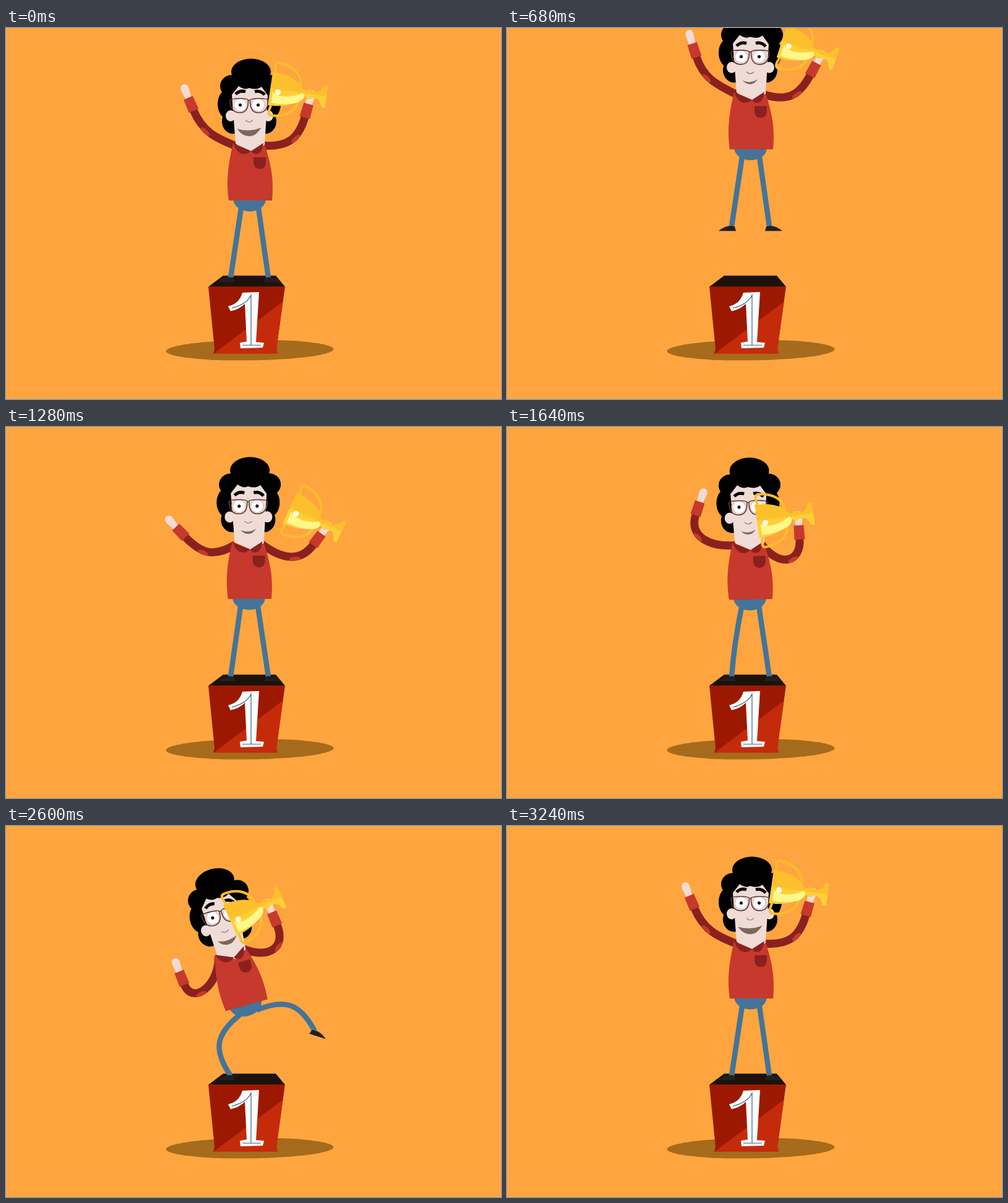
Recreate the animation shown at these times as an HTML page with a canvas. Size 800 by 600 pixels, loop 3280 ms.

```html
<!DOCTYPE html>
<html lang="en">
<head>
<meta charset="utf-8">
<title>Winner</title>
<style>
html, body { margin: 0; width: 100%; height: 100%; overflow: hidden; background: #ffa53f; }
canvas { display: block; width: 800px; height: 600px; }
</style>
</head>
<body>
<canvas id="stage" width="800" height="600"></canvas>
<script>
const ctx = document.getElementById('stage').getContext('2d');
const LOOP = 3280, FLOOR = 404;
const RED = '#c6392c', MAROON = '#8a211f', SKIN = '#f0dcd7', JEANS = '#447499', GOLD = '#fcbd2b';

// Hip position and tilt, smile and kick amounts, wrists relative to the hip with hand turns.
const cheer = {
  x: 394, y: 279, tilt: 0, smile: 1, kick: 0,
  leftX: -91, leftY: -146, leftTurn: -23, rightX: 89, rightY: -135, rightTurn: 16
};
const pose = changes => ({ ...cheer, ...changes });
const crouch = pose({ y: 314, smile: 0, leftX: -116, leftY: -75, leftTurn: -75, rightX: 97, rightY: -70, rightTurn: 65 });
const jump = pose({ smile: 0.15, leftX: -88, leftY: -150, leftTurn: -18, rightX: 96, rightY: -120, rightTurn: 28 });
const land = pose({ x: 395, y: 308, tilt: 4, smile: 0, leftX: -82, leftY: -66, leftTurn: -5, rightX: 114, rightY: -71, rightTurn: 58 });
const swing = pose({ x: 393, y: 278, smile: 0.2, leftX: -105, leftY: -90, leftTurn: -50, rightX: 108, rightY: -85, rightTurn: 45 });
const settle = pose({ x: 393, tilt: -1, smile: 0.1, leftX: -88, leftY: -137, leftTurn: 18, rightX: 80, rightY: -98, rightTurn: -4 });
const kick = pose({ x: 389, y: 289, tilt: -13, smile: 0.2, kick: 1, leftX: -107, leftY: -60, leftTurn: -2, rightX: 64, rightY: -143, rightTurn: 8 });
const lean = pose({ x: 388, y: 290, tilt: -15.6, smile: 0.6, kick: 1.25, leftX: -100, leftY: -34, leftTurn: -22, rightX: 50, rightY: -130, rightTurn: -23 });

const timeline = [
  [0, cheer], [240, crouch], [440, jump], [840, jump], [1000, land], [1200, swing],
  [1640, settle], [2040, kick], [2600, lean], [2900, cheer], [LOOP, cheer]
];
const flight = { start: 440, end: 900, height: 83 };
const sweepStarts = [804, 2700];

const rad = d => d * Math.PI / 180;
const clamp = v => Math.max(0, Math.min(1, v));
const add = (a, b) => [a[0] + b[0], a[1] + b[1]];
const mix = (a, b, u) => [a[0] + (b[0] - a[0]) * u, a[1] + (b[1] - a[1]) * u];
const turn = ([x, y], deg) => {
  const c = Math.cos(rad(deg)), s = Math.sin(rad(deg));
  return [x * c - y * s, x * s + y * c];
};

// Monotone cubic interpolation between poses, flat at every extreme.
function poseAt(t) {
  let i = 0;
  while (i < timeline.length - 2 && t >= timeline[i + 1][0]) i++;
  const [t0, from] = timeline[i], [t1, to] = timeline[i + 1];
  const h = t1 - t0, u = (t - t0) / h, w = 1 - u;
  const slope = (k, part) =>
    (timeline[k + 1][1][part] - timeline[k][1][part]) / (timeline[k + 1][0] - timeline[k][0]);
  const tangent = (k, part) => {
    if (k === 0 || k === timeline.length - 1) return 0;
    const a = slope(k - 1, part), b = slope(k, part);
    return a * b <= 0 ? 0 : 2 * a * b / (a + b);
  };
  const result = {};
  for (const part in from) {
    result[part] = from[part] * (1 + 2 * u) * w * w + to[part] * u * u * (3 - 2 * u)
      + h * u * w * (tangent(i, part) * w - tangent(i + 1, part) * u);
  }
  return result;
}

function hopAt(t) {
  const u = clamp((t - flight.start) / (flight.end - flight.start));
  return flight.height * 4 * u * (1 - u);
}

function shape(d, fill) { ctx.fillStyle = fill; ctx.fill(new Path2D(d)); }
function line(d, color, width) {
  ctx.strokeStyle = color; ctx.lineWidth = width; ctx.stroke(new Path2D(d));
}
function oval(x, y, rx, ry, fill, angle = 0) {
  ctx.fillStyle = fill;
  ctx.beginPath(); ctx.ellipse(x, y, rx, ry, angle, 0, 7); ctx.fill();
}
function at([x, y], deg, draw, flip = 1) {
  ctx.save(); ctx.translate(x, y); ctx.rotate(rad(deg)); ctx.scale(flip, 1);
  draw(); ctx.restore();
}

// Where a limb of fixed length bulges to when its ends come closer.
function elbow(a, b, length, side) {
  const dx = b[0] - a[0], dy = b[1] - a[1], d = Math.hypot(dx, dy);
  const bulge = 0.83 * Math.sqrt(Math.max(0, length * length - d * d)) * side / d;
  return add(mix(a, b, 0.5), [-dy * bulge, dx * bulge]);
}

function leg(hip, foot, side) {
  const knee = elbow(hip, foot, 114, side);
  line(`M${hip} C${mix(hip, knee, 0.75)} ${mix(foot, knee, 0.75)} ${foot}`, JEANS, 8.5);
}

function arm(shoulder, wrist, angle, side) {
  const c1 = mix(shoulder, elbow(shoulder, wrist, 92, side), 0.75);
  const c2 = add(wrist, turn([0, 38], angle));
  line(`M${shoulder} C${c1} ${c2} ${wrist}`, MAROON, 13);
  // Elbow patch on the outer edge, by splitting the curve.
  const u = 0.6, mid = mix(c1, c2, u);
  const p = mix(mix(shoulder, c1, u), mid, u), q = mix(mid, mix(c2, wrist, u), u);
  const dir = Math.atan2(q[1] - p[1], q[0] - p[0]), spot = mix(p, q, u);
  oval(spot[0] - Math.sin(dir) * 3.4 * side, spot[1] + Math.cos(dir) * 3.4 * side, 9, 3.4, RED, dir);
  at(wrist, angle, () => {
    shape('M-5 -20 L-6 -37 Q-5 -45 1 -45 Q7 -44 7 -37 L5 -20 Z', SKIN);
    shape('M-8.5 1 L8.5 1 L8 -22 L-8 -22 Z', RED);
  });
}

function shoe(p, deg, flip) {
  at(p, deg, () => shape('M-21 7 Q-7 -4 5 0 L7 7 Z', '#221f1e'), flip);
}

function ground() {
  ctx.save();
  ctx.beginPath(); ctx.ellipse(394, 521, 135.5, 16.5, rad(-0.7), 0, 7); ctx.clip();
  ctx.fillStyle = '#b4761f'; ctx.fillRect(250, 500, 290, 40);
  ctx.fillStyle = '#985f19';
  for (let y = 504; y < 540; y += 2) ctx.fillRect(250, y, 290, 1);
  ctx.restore();
}

const ONE = 'M359 450 Q377 446 382 428 L409 427 L404 508 L417 509 L415 517 L379 518 L378 509 L389 507 L386 446 Q377 455 363 458 Z';

function podium(t) {
  const lit = '#c42b0b';
  let glow = 0;
  shape('M351 400.5 H436 L451 418.5 H327 Z', '#1b1309');
  ctx.save();
  ctx.clip(new Path2D('M327 418 H451 L437 519 L439 527 H335 L337 519 Z'));
  ctx.fillStyle = '#9d1800'; ctx.fillRect(320, 410, 140, 120);
  shape('M335 527 L451 440 V530 H335 Z', lit);
  for (const start of sweepStarts) {
    const age = t - start;
    if (age < 0 || age > 420) continue;
    const x = 263 + age * 0.5;
    shape(`M${x} 527 L${x + 64} 418 H${x + 40} L${x - 24} 527 Z`, lit);
    glow = clamp(Math.min((age - 105) / 70, (400 - age) / 120));
  }
  ctx.restore();
  shape(ONE, '#fff');
  ctx.globalAlpha = 1 - glow;
  line('M365 453 Q389 447 396 432 V513 M382 513 H412', '#365f86', 1.2);
  ctx.globalAlpha = glow;
  ctx.save();
  ctx.shadowColor = '#ff8a00'; ctx.shadowBlur = 9;
  line(ONE, '#ffb52e', 2);
  ctx.restore();
  shape(ONE, '#fff');
  ctx.globalAlpha = 1;
}

function torso() {
  shape('M-27 -92 C-36 -55 -38 -30 -34 0 L36 0 C40 -40 32 -65 23 -94 L3 -80 Z', RED);
  shape('M6 -70 H26 V-61 Q25 -51 16 -51 Q7 -51 6 -61 Z', MAROON);
}

function collar() {
  shape('M-26 -92 L2 -80 Q-6 -73 -14 -76 Q-23 -80 -26 -92 Z M2 -80 L22 -93 Q20 -79 14 -76 Q7 -73 2 -80 Z', MAROON);
}

function hair() {
  const black = '#000';
  oval(-1, -129, 32, 21.5, black);
  oval(-1, -110, 34, 18, black);
  for (const s of [-1, 1]) {
    oval(s * 31 - 1, -106, 19, 18, black);
    oval(s * 32 - 4, -77, 19, 25, black);
    oval(s * 26 - 4, -49, 18, 20, black);
  }
}

function glasses() {
  for (const flip of [1, -1]) {
    at([-4, 0], 0, () => {
      line('M-31 -83 Q-30 -86 -16 -86 Q-2 -86 -1.5 -83 Q-1 -63 -15 -63 Q-30 -63 -31 -83 Z M-2 -83 H0', '#5a3c37', 1.6);
    }, flip);
  }
}

function head(smile) {
  hair();
  shape('M-32 -92 L-21 -106 Q-11 -99 -4 -103 Q8 -99 16 -105 L26 -91 L21 -11 L1 0 L-26 -13 Z', SKIN);
  ctx.translate(0, 5.5 * (1 - smile));
  for (const x of [-34, 27]) oval(x, -58, 8, 9, SKIN);
  line('M-26 -93 Q-19 -100 -10 -97 M5 -97 Q14 -100 21 -92', '#000', 5);
  for (const x of [-18.5, 10.5]) {
    oval(x, -75.5, 12.5, 11, '#e3cbc8');
    oval(x, -75.5, 9.5, 9.5, '#fff');
    oval(x, -75.5, 2.6, 2.6, '#1d1412');
  }
  glasses();
  line('M-10 -51 Q-4 -45 2 -51', '#a3857f', 1.5);
  const w = 11 + 8.5 * smile, depth = 6 + 7 * smile;
  ctx.translate(-4, -38);
  shape(`M${-w} 1 Q0 7 ${w} -1 Q${w * 0.55} ${depth * 1.05} 0 ${depth} Q${-w * 0.6} ${depth} ${-w} 1 Z`, '#7d675c');
}

function trophy() {
  const half = 'M-64 0 V-27 Q-62 -28 -58 -27 C-36 -26 -20 -19 -11 -6 L-5 -5 Q-3 -9 1 -8 Q4 -6 6 -5 C15 -4 19 -9 21 -16 Q24 -20 28 -18 V0 Z';
  const shade = ctx.createLinearGradient(0, -27, 0, 27);
  shade.addColorStop(0, '#fdbd2c'); shade.addColorStop(1, '#ffd53b');
  ctx.translate(-3, 0);
  for (const s of [1, -1]) {
    ctx.save(); ctx.scale(1, s);
    line('M-59 -27 Q-64 -43 -56 -43 C-33 -42 -14 -29 -17 -8', GOLD, 4);
    ctx.restore();
  }
  for (const s of [1, -1]) {
    ctx.save(); ctx.scale(1, s);
    shape(half, s > 0 ? '#fdc02d' : '#ffcf38');
    ctx.restore();
  }
  ctx.fillStyle = shade; ctx.fillRect(-63, -1, 90, 2);
  shape('M-59 5 C-45 14 -25 8 -12 0 C-5 2 -7 10 -17 16 Q-34 24 -59 23 Z', '#fff78a');
  oval(-51, 4, 4.5, 4.5, '#fffde2');
}

function draw(t) {
  const p = poseAt(t), hop = hopAt(t);
  const hip = [p.x, p.y - hop];
  const joint = (x, y) => add(hip, turn([x, y], p.tilt));
  const leftFoot = [363, FLOOR - hop];
  const rightFoot = [424 + 60 * p.kick, FLOOR - hop - 58 * p.kick];
  const leftWrist = add(hip, [p.leftX, p.leftY]), rightWrist = add(hip, [p.rightX, p.rightY]);
  const neck = add(joint(3, -79), [0, Math.max(0, p.y - cheer.y) * 0.2]);

  ctx.fillStyle = '#ffa53f'; ctx.fillRect(0, 0, 800, 600);
  ground();
  podium(t);

  leg(joint(-14, 12), leftFoot, 1);
  leg(joint(14, 12), rightFoot, -1);
  shoe(leftFoot, 0, 1);
  shoe(rightFoot, 3 * p.kick ** 8, -1);
  at(hip, p.tilt, () => shape('M-27 -2 H26 C24 24 -24 24 -27 -2 Z', JEANS));

  arm(joint(-22, -88), leftWrist, p.leftTurn, -1);
  arm(joint(20, -89), rightWrist, p.rightTurn, 1);
  at(hip, p.tilt, torso);
  at(neck, p.tilt * 0.9, () => head(p.smile));
  at(hip, p.tilt, collar);
  at(add(rightWrist, turn([0, -38], p.rightTurn)), p.rightTurn * 0.83 - 5, trophy);
}

function tick() {
  draw(performance.now() % LOOP);
  requestAnimationFrame(tick);
}
tick();
</script>
</body>
</html>
```
